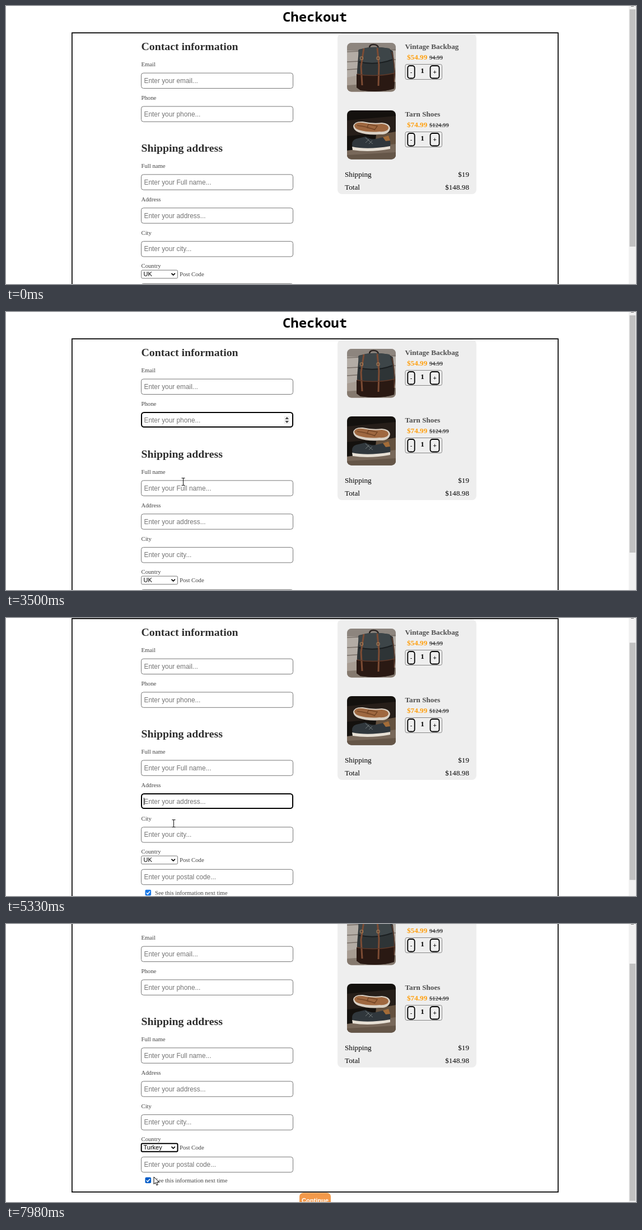
An HTML page with a canvas that plays this animation: 1125x498 px, repeating every 8000 ms.

```html
<!DOCTYPE html>
<html lang="en">
<head>
<meta charset="utf-8">
<title>Checkout</title>
<style>
  html, body { margin: 0; width: 100%; height: 100%; overflow: hidden; background: #fff; }
  canvas { display: block; }
</style>
</head>
<body>
<canvas id="stage" width="1125" height="498"></canvas>
<script>
const ctx = document.getElementById('stage').getContext('2d');
const LOOP = 8000;
const SERIF = '"Liberation Serif", serif';
const SANS = '"Liberation Sans", sans-serif';
const GREY = '#767676', INK = '#2f2f2f';

// label, placeholder, label baseline, top of the input
const FIELDS = [
  ['Email', 'Enter your email...', 108, 119.6],
  ['Phone', 'Enter your phone...', 168, 179.4],
  ['Full name', 'Enter your Full name...', 290, 301.4],
  ['Address', 'Enter your address...', 350, 361.3],
  ['City', 'Enter your city...', 409.7, 421.1],
  ['Country', 'Enter your postal code...', 469.3, 496.8],
];
const COUNTRIES = ['Turkey', 'Germany', 'UK', 'Canada', 'USA'];

// time, index of the field that takes focus
const FOCUS = [[0, -1], [1860, 0], [2960, 1], [4300, 2], [4950, 3], [6420, -1]];
const CLICKS = [1830, 2930, 4270, 4930, 6420, 7230];
// time, x, y of the pointer
const PATH = [
  [460, 1068, 488], [1000, 335, 235], [1170, 295, 180], [1240, 299, 150], [1310, 299, 150],
  [1510, 304, 143], [1920, 304, 143], [2270, 293, 184], [2530, 287, 191], [2600, 287, 192],
  [3060, 287, 192], [3480, 316, 304], [4400, 316, 304], [4860, 299, 368], [5700, 299, 368],
  [5950, 299, 402], [6840, 299, 402], [6960, 283, 412], [7590, 283, 412], [7980, 264, 453],
];

function text(str, x, y, font, color = '#000', align = 'left') {
  ctx.font = font;
  ctx.fillStyle = color;
  ctx.textAlign = align;
  ctx.fillText(str, x, y);
}

function box(x, y, w, h, r, fill, stroke, line = 1) {
  ctx.beginPath();
  ctx.roundRect(x, y, w, h, r);
  if (fill) { ctx.fillStyle = fill; ctx.fill(); }
  if (stroke) { ctx.strokeStyle = stroke; ctx.lineWidth = line; ctx.stroke(); }
}

function shape(d, fill, stroke, line = 1) {
  const path = new Path2D(d);
  if (fill) { ctx.fillStyle = fill; ctx.fill(path); }
  if (stroke) { ctx.strokeStyle = stroke; ctx.lineWidth = line; ctx.stroke(path); }
}

function at(x, y, draw) {
  ctx.save();
  ctx.translate(x, y);
  draw();
  ctx.restore();
}

function shadowed(draw) {
  ctx.save();
  ctx.shadowColor = 'rgba(0,0,0,.3)';
  ctx.shadowBlur = 5;
  ctx.shadowOffsetY = 1;
  draw();
  ctx.restore();
}

function pointerAt(t) {
  if (t < PATH[0][0]) return null;
  const i = PATH.findIndex(p => p[0] > t);
  if (i < 0) return PATH.at(-1).slice(1);
  const [t0, x0, y0] = PATH[i - 1], [t1, x1, y1] = PATH[i];
  const p = (t - t0) / (t1 - t0), e = p * p * (3 - 2 * p);
  return [x0 + (x1 - x0) * e, y0 + (y1 - y0) * e];
}

function backpack() {
  box(0, 0, 87, 88, 0, '#b3aca5');
  shape('M0 0H87V14H0Z', '#8d857e');
  shape('M0 16L87 12M0 34L87 30M0 48L30 46', null, '#786f68', 1.5);
  shape('M0 62L30 56V88H0Z', '#a79c92');
  shape('M0 76L87 70V88H0Z', '#85796e');
  shape('M40 9Q40 3 47 3Q55 3 56 9', null, '#2b2422', 2.5);
  shape('M21 12L34 9Q50 6 74 10L82 15L86 52L84 82Q60 90 24 85L17 80L18 50Z', '#2e3436');
  shape('M17 56Q50 61 86 54L84 82Q60 90 24 85L17 80Z', '#2a1913');
  shape('M20 13L34 9Q50 6 76 10L81 30Q55 40 22 34Z', '#3d4548');
  shape('M21 34Q52 41 81 30', null, '#1b1f21', 2);
  shape('M30 10L25 42L27 76M54 9L57 40L56 77', null, '#7d4c34', 3);
  shape('M80 16Q86 36 84 70M18 56Q50 62 86 54', null, '#5f3a2a', 1.5);
  box(23.5, 25, 5, 5, 1, null, '#b58a5d');
  box(53, 25, 5, 5, 1, null, '#b58a5d');
}

function shoes() {
  box(0, 0, 87, 88, 0, '#14110e');
  shape('M0 18L87 10V38L0 46Z', '#261e19');
  shape('M52 44L87 38V62H50Z', '#64513f');
  shape('M0 72L87 60V88H0Z', '#78685a');
  shape('M0 80L87 75V88H0Z', '#655648');
  shape('M11 28Q13 19 28 20Q46 24 62 22Q76 23 77 32Q75 44 58 43Q38 45 20 39Q11 35 11 28Z', '#d9d0c4');
  shape('M13 27Q15 21 28 22Q46 26 62 24Q74 25 74 32Q72 39 58 38Q38 40 21 35Q13 32 13 27Z', '#9f6840');
  shape('M18 27Q36 29 50 35M38 25L54 28L50 34L36 31Z', null, '#744626', 1.5);
  shape('M9 62Q8 54 16 51L33 47Q44 54 56 50L73 46Q79 53 77 67L40 70L10 68Z', '#30373c');
  shape('M64 48L74 45L77 54L69 55Z', '#a36c38');
  shape('M33 49L46 60M39 52L33 58M45 54L39 60', null, '#737a7a');
  shape('M9 65Q36 71 77 64L77 69Q40 76 10 71Z', '#e6dfd4');
}

function product(y, photo, name, price, oldPrice, strikeWidth) {
  at(0, y, () => {
    at(609, 66, () => {
      ctx.beginPath();
      ctx.roundRect(0, 0, 87, 87.5, 8);
      ctx.clip();
      photo();
    });
    text(name, 712.5, 77, `bold 13.2px ${SERIF}`, '#4f4f4f');
    text(price, 716, 96, `bold 13.2px ${SERIF}`, '#ffa010');
    text(oldPrice, 756, 96, `bold 10.7px ${SERIF}`, '#4f4f4f');
    box(756, 92, strikeWidth, 1, 0, '#4f4f4f');
    box(713, 104.5, 65.5, 27, 3, null, '#858585');
    box(717.3, 107, 12.4, 22.5, 4, '#efefef', '#000', 1.8);
    box(757.6, 107, 16, 22.5, 4, '#efefef', '#000', 1.8);
    text('-', 723.5, 122, `11px ${SANS}`, '#000', 'center');
    text('+', 765.6, 122, `11px ${SANS}`, '#000', 'center');
    text('1', 743.5, 120, `bold 13.2px ${SERIF}`, '#000', 'center');
  });
}

function summary() {
  box(592, 49.5, 248, 287.5, 8, '#eee');
  product(0, backpack, 'Vintage Backbag', '$54.99', '94.99', 24);
  product(121, shoes, 'Tarn Shoes', '$74.99', '$124.99', 35);
  [['Shipping', '$19', 306], ['Total', '$148.98', 329]].forEach(([label, sum, y]) => {
    text(label, 605, y, `13.2px ${SERIF}`);
    text(sum, 827, y, `13.2px ${SERIF}`, '#000', 'right');
  });
}

function spinner(y) {
  box(496.5, y + 7, 10, 14, 0, '#efefef');
  shape(`M498.5 ${y + 12.5}l3.2 -4l3.2 4zM498.5 ${y + 15.5}l3.2 4l3.2 -4z`, '#444');
}

function form(t, hovered) {
  const [since, focused] = FOCUS.findLast(f => f[0] <= t);
  text('Contact information', 241.5, 79, `bold 19.8px ${SERIF}`, INK);
  text('Shipping address', 241.5, 261, `bold 19.8px ${SERIF}`, INK);

  FIELDS.forEach(([label, hint, labelY, y], i) => {
    const active = i === focused;
    text(label, 241.5, labelY, `10.7px ${SERIF}`, '#444');
    if (active) box(242, Math.floor(y) + 1, 270, 26, 4.5, '#fff', '#000', 2);
    else box(241.5, y + .5, 271, 27.4, 4, '#fff', GREY);
    text(hint, 246.5, y + 18.3, `11.87px ${SANS}`, '#757575');
    if (active && (t - since) % 1000 < 500) box(246, Math.floor(y) + 8, 1, 13, 0, '#000');
    if (i === 1 && (active || hovered === 1)) spinner(y);
  });

  const picked = t >= 7230;
  box(241.7, 473.2, 64.8, 14.6, 2, '#fff', picked ? '#000' : GREY, picked ? 2 : 1);
  text(picked ? 'Turkey' : 'UK', 245.5, 484.4, `11px ${SANS}`);
  shape('M295.5 478.8l3.2 3.2l3.2 -3.2', null, '#000', 1.7);
  text('Post Code', 310, 484, `10.7px ${SERIF}`, '#444');

  box(248.5, 533.7, 10.6, 10.6, 2, t > 7900 ? '#005cc8' : '#1878e8');
  shape('M250.8 539.3l2.2 2.2l4 -4.8', null, '#fff', 1.6);
  text('See this information next time', 266, 543, `10.7px ${SERIF}`, '#444');
}

function suggestions() {
  shadowed(() => shape('M325 155H338L343 150L348 155H461Q463 155 463 157V220Q463 222 461 222H325Q323 222 323 220V157Q323 155 325 155Z', '#fff'));
  text('tolbrin@example.com', 333.5, 177.5, '10.8px "Open Sans", sans-serif', '#222');
  text('aa', 333.5, 207.5, '10.8px "Open Sans", sans-serif', '#222');
}

function countryList(t) {
  const current = t < 6900 ? 2 : 0;
  shadowed(() => box(241.5, 408.5, 65, 70, 0, '#fff', GREY));
  COUNTRIES.forEach((name, i) => {
    const y = 409 + i * 13.75;
    if (i === current) box(242, y, 64, 13.8, 0, '#1e90ff');
    text(name, 245.5, y + 10.4, `10.9px ${SANS}`, i === current ? '#fff' : '#000');
  });
}

function pointer(x, y, overInput) {
  at(x, y, () => {
    if (overInput) shape('M-2.5 -6.5H3.5M.5 -6.5V6.5M-2.5 6.5H3.5', null, '#111');
    else shape('M0 0V13L3 10.2L5 15L7.2 14L5.2 9.5H9.3Z', '#fff', '#000');
  });
}

function draw(t) {
  const p = Math.min(1, Math.max(0, (t - 5260) / 280));
  const scroll = Math.round(80 * (1 - (1 - p) ** 3));
  const mouse = pointerAt(t);
  // hover is only refreshed once scrolling has ended
  const settled = p < 1 ? 0 : scroll;
  const hovered = mouse ? FIELDS.findIndex(f => {
    const dy = mouse[1] + settled - f[3];
    return mouse[0] > 241 && mouse[0] < 513 && dy >= 0 && dy <= 28;
  }) : -1;
  const listOpen = t >= 6420 && t < 7230;

  ctx.fillStyle = '#fff';
  ctx.fillRect(0, 0, 1125, 498);
  at(0, -scroll, () => {
    text('Checkout', 551.5, 28, 'bold 24px "Noto Sans Mono", monospace', '#000', 'center');
    box(117.9, 48.1, 868, 512, 0, null, '#000', 1.7);
    summary();
    form(t, hovered);
    box(524, 561.5, 56, 27, 7, '#f3994a');
    text('Continue', 552, 579.3, `bold 11.1px ${SANS}`, '#fff', 'center');
  });

  box(1112, 0, 13, 498, 0, '#f1f1f1');
  box(1113.5, 6 + scroll * 65 / 80, 10.5, 425, 0, '#c1c1c1');
  box(1116, 0, 5, 1, 0, '#777');

  if (t >= 1900 && t < 2960) suggestions();
  if (listOpen) countryList(t);
  if (mouse) {
    if (CLICKS.some(c => t >= c && t < c + 70)) {
      ctx.beginPath();
      ctx.arc(mouse[0], mouse[1], 9.5, 0, 7);
      ctx.fillStyle = 'rgba(250,225,50,.72)';
      ctx.fill();
    }
    pointer(...mouse, hovered >= 0 && !listOpen);
  }
}

const start = performance.now();
function tick() {
  draw((performance.now() - start) % LOOP);
  requestAnimationFrame(tick);
}
tick();
</script>
</body>
</html>
```
